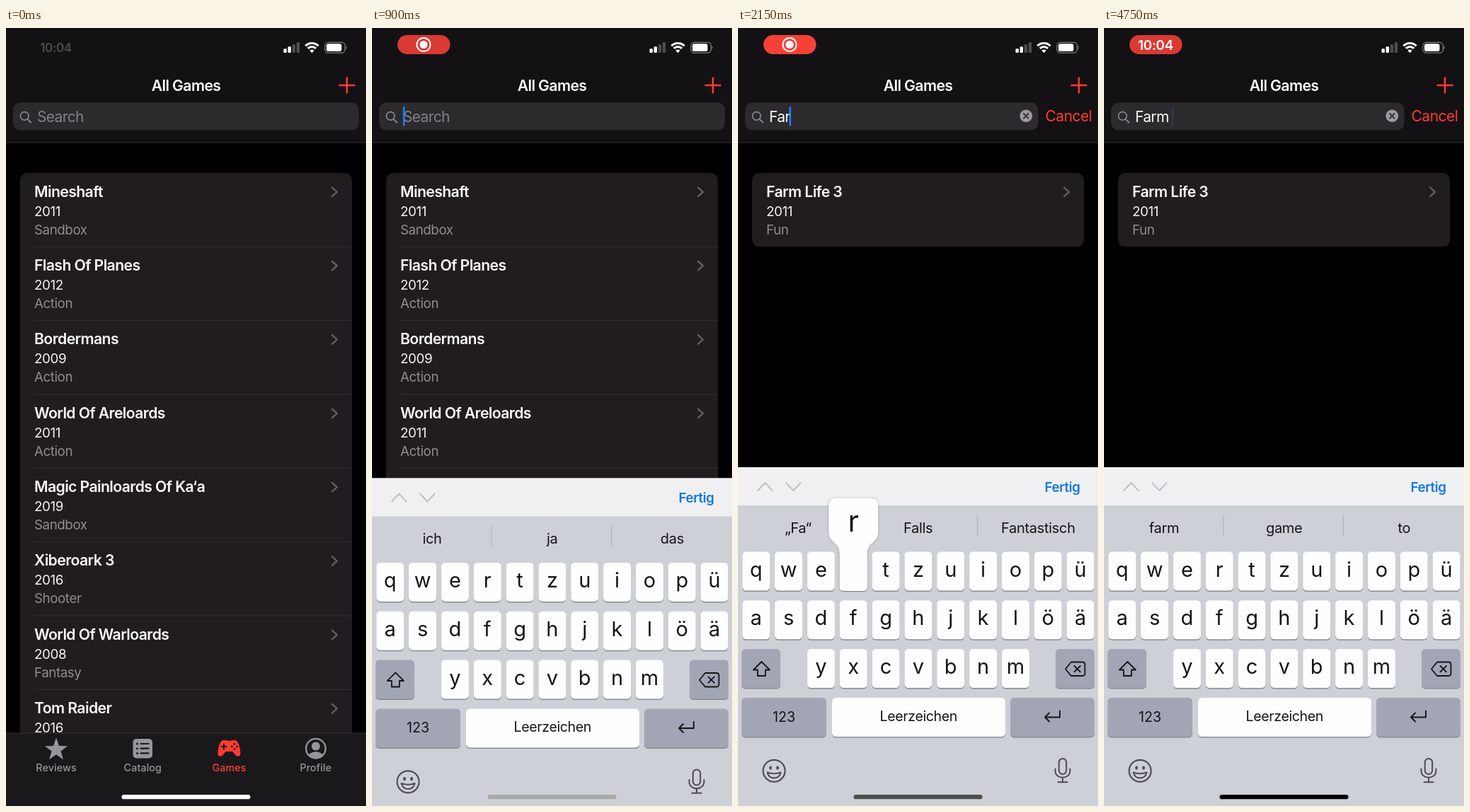
Recreate the animation shown at these times as an HTML page with a canvas. Size 509x1100 px, loop 4800 ms.

```html
<!DOCTYPE html>
<html lang="en">
<head>
<meta charset="utf-8">
<title>All Games</title>
<style>
html, body { margin: 0; width: 100%; height: 100%; overflow: hidden; background: #000; }
canvas { display: block; width: 509px; height: 1100px; }
</style>
</head>
<body>
<canvas id="stage"></canvas>
<script>
const LOOP = 4800, ROW = 104.35, RED = '#ff3b30', INK = '#141416', MOD = '#a2a6b4';
const GREY = '#98959a';
const canvas = document.getElementById('stage');
const dpr = window.devicePixelRatio || 1;
canvas.width = 509 * dpr;
canvas.height = 1100 * dpr;
const c = canvas.getContext('2d');

const games = [
  ['Mineshaft', 2011, 'Sandbox'], ['Flash Of Planes', 2012, 'Action'],
  ['Bordermans', 2009, 'Action'], ['World Of Areloards', 2011, 'Action'],
  ['Magic Painloards Of Ka‘a', 2019, 'Sandbox'], ['Xiberoark 3', 2016, 'Shooter'],
  ['World Of Warloards', 2008, 'Fantasy'], ['Tom Raider', 2016, 'Action'],
  ['Farm Life 3', 2011, 'Fun']
];
const presses = [[1680, 'F'], [1900, 'a'], [2110, 'r'], [2510, 'm'], [2710, ' ']];
const hints = [
  [0, 'ich', 'ja', 'das'], [1290, 'Ich', 'Ja', 'Das'], [1790, '„F“', 'Für', 'Falls'],
  [2000, '„Fa“', 'Falls', 'Fantastisch'], [2300, '„Far“', 'Farbe', 'Farben'],
  [2650, '„Farm“', 'Farmer', 'Farmers'], [2950, 'farm', 'game', 'to']
];
const keyRows = ['qwertzuiopü', 'asdfghjklöä', '  yxcvbnm'];
const PRESS = 110;

const clamp = v => Math.max(0, Math.min(1, v));
const ramp = (t, from, to) => clamp((t - from) / (to - from));
const smooth = p => p * p * (3 - 2 * p);
const mix = (a, b, p) => a + (b - a) * p;

function text(str, x, y, size, color, { weight = 400, space = 0, align = 'left' } = {}) {
  c.font = `${weight} ${size}px Inter, Roboto, sans-serif`;
  c.letterSpacing = space + 'px';
  c.textAlign = align;
  c.fillStyle = color;
  c.fillText(str, x, y);
}
function rect(x, y, w, h, r, color) {
  c.fillStyle = color;
  c.beginPath();
  c.roundRect(x, y, w, h, r);
  c.fill();
}
function line(d, color, width, cap = 'round') {
  c.strokeStyle = color;
  c.lineWidth = width;
  c.lineCap = cap;
  c.lineJoin = cap === 'round' ? 'round' : 'miter';
  c.stroke(new Path2D(d));
}
function shape(d, color) {
  c.fillStyle = color;
  c.fill(new Path2D(d));
}
function disc(x, y, r, color, width) {
  c.beginPath();
  c.arc(x, y, r, 0, 7);
  c.fillStyle = c.strokeStyle = color;
  if (width) { c.lineWidth = width; c.stroke(); } else c.fill();
}
function faded(alpha, draw) {
  if (alpha <= 0) return;
  c.save();
  c.globalAlpha *= alpha;
  draw();
  c.restore();
}

function drawList(query, dim) {
  const rows = games.filter(g => g[0].toLowerCase().includes(query.toLowerCase()));
  rect(20, 205, 469, rows.length * ROW, 10, '#201c1f');
  rows.forEach(([name, year, genre], i) => {
    const y = 205 + i * ROW;
    text(name, 40, y + 33.5, 21.2, '#fbfafb', { weight: 600, space: -0.6 });
    text(year, 40, y + 60.6, 18.8, '#f6f5f6', { space: -0.4 });
    text(genre, 40, y + 86.6, 18.7, '#8f8d91', { space: -0.4 });
    line(`M461 ${y + 20.5}l7 6.300l-7 6.300`, '#636065', 2.3);
    if (i) rect(40, y - 0.6, 449, 1.2, 0, '#312d31');
  });
  if (dim) rect(0, 163, 509, 937, 0, `rgba(0,0,0,${0.41 * dim})`);
}

function drawStatus(t) {
  faded(0.25 * (1 - ramp(t, 0, 150)), () =>
    text('10:04', 70.5, 34, 17, '#fff', { weight: 600, space: -0.4, align: 'center' }));
  const pulse = 0.5 - 0.5 * Math.cos((t - 850) / 1000 * Math.PI);
  const swap = ramp(t, 4000, 4250);
  faded(ramp(t, 30, 330), () => {
    rect(36, 10, 74.5, 27, 13.5,
      `rgb(${mix(217, 255, pulse)},${mix(58, 67, pulse)},${mix(51, 57, pulse)})`);
    faded(1 - swap, () => {
      disc(73, 23.5, 9.6, '#fff', 2);
      disc(73, 23.5, 5.6, '#fff');
    });
    faded(swap, () =>
      text('10:04', 72.8, 30.5, 19, '#fff', { weight: 600, space: -0.4, align: 'center' }));
  });
  for (let i = 0; i < 4; i++)
    rect(392.5 + i * 6.1, 29.3 - i * 3, 4.4, 5.7 + i * 3, 1.2, i < 2 ? '#fff' : '#4f4c50');
  // Wi-Fi: nested arcs
  for (const [r, w] of [[13, 3], [8, 3]]) {
    c.beginPath();
    c.arc(432.5, 34.5, r, -Math.PI * 0.75, -Math.PI * 0.25);
    c.lineWidth = w;
    c.lineCap = 'butt';
    c.strokeStyle = '#fff';
    c.stroke();
  }
  shape('M432.500 35.200l-3.200-3.500q3.200-2.600 6.400 0z', '#fff');
  c.strokeStyle = '#858287';
  c.lineWidth = 1.2;
  c.beginPath();
  c.roundRect(451, 20.3, 28.4, 14.8, 4.6);
  c.stroke();
  rect(453, 22.3, 21.5, 10.8, 2.8, '#fff');
  shape('M480.700 25.200q2.400 2.500 0 5z', '#858287');
}

function drawHeader(t, query, active) {
  rect(0, 0, 509, 162, 0, '#141115');
  rect(0, 161.5, 509, 1.2, 0, '#2c292d');
  drawStatus(t);
  text('All Games', 254.5, 88.7, 21.2, '#fff', { weight: 600, space: -0.6, align: 'center' });
  line('M470.500 81h23M482 69.500v23', RED, 2.5, 'butt');
  const right = mix(499, 424.5, active);
  rect(10, 105.5, right - 10, 39, 10.5, '#2d2a2e');
  disc(26.2, 124.4, 5.8, '#8d8a91', 1.6);
  line('M30.500 128.800l4.700 4.700', '#8d8a91', 1.8);
  const style = { space: -0.6 };
  text(query || 'Search', 44, 132.5, 20.9, query ? '#fbfafb' : '#838087', style);
  const caret = 44.5 + (query ? c.measureText(query).width - 1 : 0);
  if (query) {
    disc(407.3, 124.3, 8.8, '#9d9aa0');
    line('M404 121l6.600 6.600M410.600 121l-6.600 6.600', '#2d2a2e', 1.9);
  }
  faded(active, () => text('Cancel', right + 10, 132, 21, RED, { space: -0.5 }));
  faded(caretAlpha(t), () => rect(caret - 0.7, 111, 2.6, 27.5, 1, '#1780f5'));
}

function caretAlpha(t) {
  if (t < 600) return 0;
  const last = Math.max(...[600, 1050, ...presses.map(p => p[0])].filter(s => s <= t));
  const since = t - last - 500;
  if (since < 0) return 1;
  const p = since % 1060;
  return p < 150 ? 1 - p / 150 : ramp(p, 440, 640);
}

function drawTabs() {
  const bar = '#1b181b';
  rect(0, 997, 509, 103, 0, bar);
  rect(0, 996.5, 509, 1.2, 0, '#302d31');
  ['Reviews', 'Catalog', 'Games', 'Profile'].forEach((name, i) =>
    text(name, 71 + i * 122.3, 1051, 14.3, i === 2 ? RED : GREY,
      { weight: 500, space: 0.1, align: 'center' }));
  c.beginPath();
  for (let i = 0; i < 10; i++) {
    const r = i % 2 ? 6.8 : 17, a = (i / 5 - 0.5) * Math.PI;
    c.lineTo(71 + r * Math.cos(a), 1020.5 + r * Math.sin(a));
  }
  c.closePath();
  c.fillStyle = GREY;
  c.fill();
  rect(179.5, 1005, 27.5, 27.5, 5, GREY);
  for (const y of [1012, 1018.7, 1025.4]) {
    disc(185.5, y, 1.5, bar);
    line(`M190.500 ${y}h11`, bar, 2.2);
  }
  shape('M307 1007h4q4.500 2 9 0h4c5 1 7 11 7.500 18c0 6-5 6-8 2l-3-4h-10l-3 4c-3 4-8 4-8-2c.5-7 2.500-17 7.500-18z', RED);
  line('M304.500 1016h7M308 1012.500v7', bar, 2.2);
  for (const [x, y] of [[0, -3.6], [3.6, 0], [0, 3.6], [-3.6, 0]]) disc(323 + x, 1016 + y, 1.4, bar);
  disc(438, 1018.7, 13.8, GREY, 2.3);
  disc(438, 1015.5, 6, GREY);
  shape('M427.500 1027.500q10.500-8.500 21 0q-10.500 9-21 0z', GREY);
}

function key(x, y, w, color = '#fefefe') {
  rect(x, y + 1.5, w, 55, 5.5, '#898b92');
  rect(x, y, w, 55, 5.5, color);
}

function popup(x, y, label) {
  const left = Math.max(3, x - 15.5), right = left + 70, top = y - 76;
  c.save();
  c.shadowColor = 'rgba(0,0,0,.3)';
  c.shadowBlur = 3 * dpr;
  shape(`M${left + 11} ${top}H${right - 11}q11 0 11 11V${top + 48}
    C${right} ${top + 64} ${x + 39} ${top + 62} ${x + 39} ${top + 79}V${y + 50}q0 5.500-5.500 5.500
    H${x + 5.5}q-5.500 0-5.500-5.500V${top + 79}
    C${x} ${top + 62} ${left} ${top + 64} ${left} ${top + 48}V${top + 11}q0-11 11-11z`, '#fefefe');
  c.restore();
  text(label, left + 35, top + 47, 41, INK, { align: 'center' });
}

function drawHints(t) {
  const i = hints.findLastIndex(h => h[0] <= t);
  const p = i ? ramp(t, hints[i][0], hints[i][0] + 150) : 1;
  const put = (set, alpha) => faded(alpha, () => set.slice(1).forEach((word, n) =>
    text(word, 85 + n * 169.7, 714, 20, INK, { space: -0.3, align: 'center' })));
  if (p < 0.4) put(hints[i - 1], 1 - p / 0.4);
  put(hints[i], i ? mix(0.2, 1, p) : 1);
  for (const x of [169, 338.5]) rect(x - 0.6, 688, 1.2, 31, 0, '#b4b5bd');
}

function drawKeyboard(t, pressed) {
  const upper = t >= 1290 && t < 1680 + PRESS;
  let pop;
  rect(0, 621, 509, 500, 0, '#ced0d7');
  rect(0, 621, 509, 54, 0, '#f0f0f2');
  line('M28 654l10.300-11l10.300 11M68 643l10.300 11l10.300-11', '#c1c0c5', 2);
  text('Fertig', 458.5, 656, 18.8, '#1078e2', { weight: 600, space: -0.4, align: 'center' });
  drawHints(t);

  keyRows.forEach((row, r) => [...row].forEach((ch, i) => {
    if (ch === ' ') return;
    const x = 6.2 + i * 45.84, y = 740.5 + r * 68.8;
    const label = upper ? ch.toUpperCase() : ch;
    key(x, y, 39);
    if (label === pressed) { pop = [x, y, label]; return; }
    text(label, x + 19.5, y + (upper ? 37 : 35), upper ? 26.5 : 29, INK, { align: 'center' });
  }));

  key(5, 878.1, 55, upper ? '#fefefe' : MOD);
  const arrow = 'M33.300 896l11.500 11.500h-6v8.500h-11v-8.500h-6z';
  if (upper) shape(arrow, '#000');
  line(arrow, upper ? '#000' : INK, 1.8);
  key(449, 878.1, 55, MOD);
  line('M471 896.500h16q3.500 0 3.500 3.500v12.500q0 3.500-3.500 3.500h-16l-8-9.700zM475.500 902l8.400 8.400M483.900 902l-8.400 8.400', INK, 1.8);

  key(5, 947, 120, MOD);
  text('123', 65, 981, 19.5, INK, { align: 'center' });
  key(133, 947, 245, pressed === ' ' ? MOD : '#fefefe');
  text('Leerzeichen', 255.3, 979.7, 19.5, INK, { space: -0.35, align: 'center' });
  key(385, 947, 119, MOD);
  line('M455 965.500v9h-20.500M440 968.500l-6 6l6 6', INK, 1.9);

  const icon = '#4c4e54';
  disc(51, 1050.3, 15.5, icon, 2.2);
  for (const x of [46, 56]) {
    c.beginPath();
    c.ellipse(x, 1046, 1.9, 2.7, 0, 0, 7);
    c.fillStyle = icon;
    c.fill();
  }
  line('M41.500 1052.500q9.500 3.500 19 0q-2 8-9.500 8t-9.500-8z', icon, 2);
  c.beginPath();
  c.roundRect(453.8, 1033, 10.4, 22, 5.2);
  c.lineWidth = 2;
  c.stroke();
  line('M448.500 1047.500v2.500c0 13 21 13 21 0v-2.500M459 1060v6.200M452.500 1066.200h13', icon, 2);
  if (pop) popup(...pop);
}

function draw(t) {
  c.setTransform(dpr, 0, 0, dpr, 0, 0);
  c.fillStyle = '#010002';
  c.fillRect(0, 0, 509, 1100);
  const query = presses.filter(p => p[0] <= t).map(p => p[1]).join('');
  const active = smooth(ramp(t, 1050, 1300));
  drawList(query, query ? 0 : active);
  drawHeader(t, query, active);
  drawTabs();

  const shown = t >= 610;
  if (shown) {
    // critically damped slide
    const s = (t - 610) * 0.0181;
    const down = 479 * (1 + s) * Math.exp(-s);
    const press = presses.find(p => t >= p[0] && t < p[0] + PRESS);
    c.save();
    c.translate(0, down);
    drawKeyboard(t, press && press[1]);
    c.restore();
  }
  const tone = shown ? 168 * (1 - ramp(t, 1200, 3000)) : 255;
  rect(163.5, 1084, 182, 6.3, 3.2, `rgb(${tone},${tone},${tone})`);
}

const start = performance.now();
function frame() {
  draw((performance.now() - start) % LOOP);
  requestAnimationFrame(frame);
}
frame();
</script>
</body>
</html>
```
